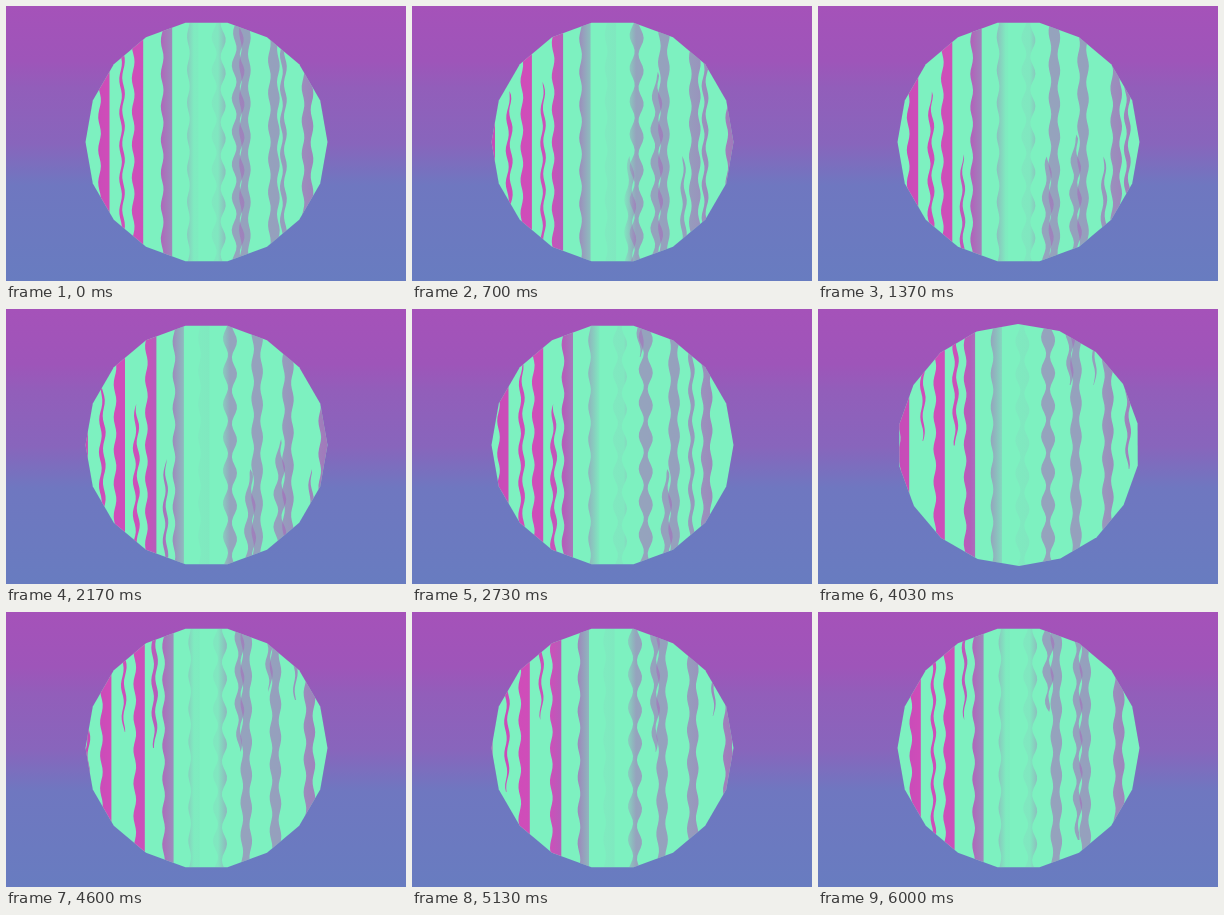
An HTML page that plays this animation: 400x275 px, repeating every 6030 ms.

```html
<!DOCTYPE html>
<html lang="en">
<head>
<meta charset="utf-8">
<title>Streaked sphere</title>
<style>
  html, body { margin: 0; width: 100%; height: 100%; overflow: hidden; background: #6a7bc0; }
  svg { display: block; width: 100vw; height: 100vh; }
</style>
</head>
<body>
<svg viewBox="0 0 400 275" preserveAspectRatio="none">
  <defs>
    <linearGradient id="sky" x2="0" y2="1">
      <stop offset="0" stop-color="#a552b9"/>
      <stop offset=".2" stop-color="#9e55b9"/>
      <stop offset=".3" stop-color="#925eba"/>
      <stop offset=".5" stop-color="#8865bc"/>
      <stop offset=".65" stop-color="#6f77c0"/>
      <stop offset="1" stop-color="#687cc0"/>
    </linearGradient>
    <linearGradient id="ink" gradientUnits="userSpaceOnUse" x1="80" x2="320">
      <stop offset="0" stop-color="#c44cb8"/>
      <stop offset=".1" stop-color="#d04cb9"/>
      <stop offset=".24" stop-color="#cc50b9"/>
      <stop offset=".3" stop-color="#b35fba"/>
      <stop offset=".36" stop-color="#a570bb" stop-opacity=".8"/>
      <stop offset=".41" stop-color="#a570bb" stop-opacity=".4"/>
      <stop offset=".45" stop-color="#a570bb" stop-opacity=".04"/>
      <stop offset=".55" stop-color="#a570bb" stop-opacity=".08"/>
      <stop offset=".6" stop-color="#a570bb" stop-opacity=".6"/>
      <stop offset=".8" stop-color="#a56abb" stop-opacity=".6"/>
      <stop offset="1" stop-color="#ab5cba" stop-opacity=".8"/>
    </linearGradient>
    <clipPath id="disc"><polygon id="rim"/></clipPath>
  </defs>
  <rect width="400" height="275" fill="url(#sky)"/>
  <g clip-path="url(#disc)">
    <rect width="400" height="275" fill="#7df1c0"/>
    <path id="bars" fill="url(#ink)"/>
    <path id="strands" fill="url(#ink)"/>
  </g>
</svg>
<script>
const LOOP = 6030, CX = 200.5, CY = 136, R = 121, TOP = 0, END = 290;
const rim = document.getElementById('rim');
const bars = document.getElementById('bars');
const strandPath = document.getElementById('strands');

// column, width, bead depth, start, finish, top at start/finish, bottom at start/finish
const strands = [
  [-3.5, 3, .2, 0, .23, TOP, 150, END, END],
  [-4.5, 4, .4, .22, .36, 85, 95, END, END],
  [-5.5, 4, .2, .36, .67, 75, TOP, 390, 138],
  [-6.5, 3, .2, .67, .85, TOP, TOP, 135, 108],
  [-7.5, 3, .2, .85, .98, TOP, TOP, 180, END],
  [.75, 8, .5, 0, .23, TOP, 130, END, END],
  [-.25, 8, .4, .22, .36, 150, 160, END, END],
  [1.65, 4, .2, .22, .36, 150, 160, END, END],
  [.55, 4, .2, .55, .67, TOP, TOP, END, 160],
  [-1.2, 6, .5, .55, .67, TOP, TOP, 50, 80],
  [-.4, 3, .2, .62, .85, TOP, TOP, 70, 105],
  [-2.25, 6, .5, .85, .99, TOP, TOP, 140, 230],
  [-3.3, 7, .7, .85, .995, TOP, TOP, TOP, 100],
  [2.3, 4, .3, 0, .2, TOP, TOP, END, END]
];
const clamp = v => Math.max(0, Math.min(1, v));
const mix = (a, b, f) => a + (b - a) * f;
const project = k => 200 + 25.2 * k + .31 * k ** 3;

function ribbon(x, width, bead, top, bottom, sway, straightRight) {
  if (x < 70 || x > 330 || bottom - top < 4) return '';
  const left = [], right = [];
  for (let y = top; y <= bottom; y += 4) {
    const angle = y * Math.PI * 2 / 33 + x * .03;
    const taper = clamp((top > TOP ? y - top : 50) / 45) * clamp((bottom < END ? bottom - y : 50) / 45);
    const half = width / 2 * (1 + bead * Math.cos(angle)) * Math.sqrt(taper);
    const drift = sway * Math.sin(angle);
    left.push(`${(x - half + drift).toFixed(1)},${y.toFixed(1)}`);
    right.unshift(`${(x + (straightRight ? width / 2 : half + drift)).toFixed(1)},${y.toFixed(1)}`);
  }
  return `M${left.concat(right).join('L')}Z`;
}

function draw(t) {
  const turn = .5 + 4 * t;
  const s = clamp((t - .58) / .18);
  const tilt = 20 * s * s * (3 - 2 * s);
  rim.setAttribute('points', Array.from({ length: 18 }, (_, i) => {
    const a = (i * 20 + tilt) * Math.PI / 180;
    return `${CX + R * Math.cos(a)},${CY + R * Math.sin(a)}`;
  }).join(' '));

  let d = '';
  for (let j = -9; j <= 4; j++) {
    const x = project(j + turn);
    d += x < 200 ? ribbon(x, 10, .12, TOP, END, 1.2, true)
                 : ribbon(x, 9, x < 235 ? .55 : .25, TOP, END, .7, false);
  }
  bars.setAttribute('d', d);

  strandPath.setAttribute('d', strands.map(([j, w, bead, from, to, topA, topB, botA, botB]) => {
    if (t < from - .15 || t > to + .15) return '';
    const f = clamp((t - from) / (to - from));
    return ribbon(project(j + turn), w, bead, mix(topA, topB, f), Math.min(END, mix(botA, botB, f)), 1.3, false);
  }).join(''));
}

const began = performance.now();
function tick() {
  draw((performance.now() - began) % LOOP / LOOP);
  requestAnimationFrame(tick);
}
tick();
</script>
</body>
</html>
```
